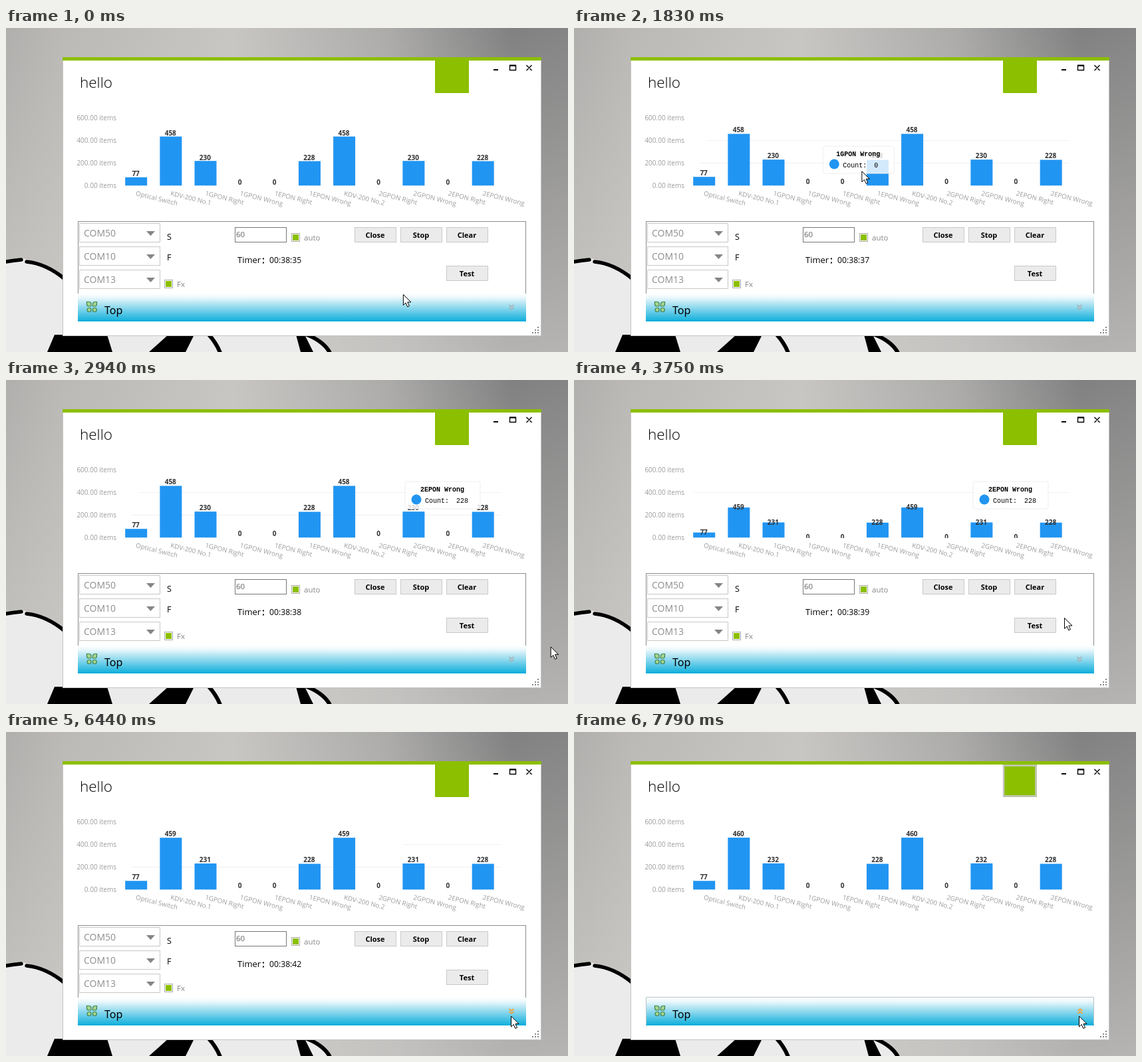
Write an HTML page that moves like this. It is 845 px wide and 488 px high and loops after 8 s.

```html
<!DOCTYPE html>
<html lang="en">
<head>
<meta charset="utf-8">
<title>Chart window</title>
<style>
html, body { margin: 0; width: 100%; height: 100%; overflow: hidden; background: #bbb; }
svg { display: block; width: 845px; height: 488px; font-family: "Open Sans", "Noto Sans", sans-serif; }
text { white-space: pre; }
.tip { font-family: "Liberation Mono", monospace; font-size: 10px; }
</style>
</head>
<body>
<svg id="stage" viewBox="0 0 845 488">
  <defs>
    <linearGradient id="wall">
      <stop offset="0" stop-color="#b0afad"/><stop offset=".1" stop-color="#bbb9b6"/>
      <stop offset=".4" stop-color="#c8c6c3"/><stop offset=".68" stop-color="#acabaa"/>
      <stop offset=".9" stop-color="#818181"/><stop offset="1" stop-color="#858585"/>
    </linearGradient>
    <linearGradient id="glow" x1="0" y1="0" x2="0" y2="1">
      <stop offset="0" stop-color="#d6d4d1" stop-opacity="0"/>
      <stop offset="1" stop-color="#d6d4d1" stop-opacity=".6"/>
    </linearGradient>
    <linearGradient id="sea" x1="0" y1="0" x2="0" y2="1">
      <stop offset="0" stop-color="#fff"/><stop offset=".15" stop-color="#eaf7fb"/>
      <stop offset="1" stop-color="#0caedb"/>
    </linearGradient>
    <clipPath id="plot"><rect x="108" y="100" width="690" height="138"/></clipPath>
  </defs>

  <rect width="845" height="488" fill="url(#wall)"/>
  <rect width="845" height="488" fill="url(#glow)"/>
  <path d="M0 351L25 347Q60 354 86 379V463H446Q474 470 488 488H0Z" fill="#ebebeb"/>
  <path d="M0 352Q12 350 23 349M31 352Q60 355 87 377" fill="none" stroke="#000" stroke-width="5.5" stroke-linecap="round"/>
  <path d="M73 462L62 488H160L152 462ZM244 462L215 488H270L283 462ZM436 462L443 488H462L449 462Z"/>
  <path d="M305 462Q316 474 322 489M450 461Q477 471 487 489" fill="none" stroke="#000" stroke-width="6"/>

  <rect x="85.500" y="44.500" width="719" height="419" fill="#fff" stroke="#c4c4c4"/>
  <rect x="85" y="44" width="720" height="5" fill="#8cbf00"/>
  <text x="111" y="90" font-size="22.500" font-weight="300">hello</text>
  <rect x="645" y="49" width="51" height="49" fill="#8cbf00"/>
  <rect id="ring" x="646" y="50.500" width="48.500" height="46" fill="none" stroke="#c6c6c6" stroke-width="2.500"/>
  <path d="M733 63H740M757 56.500H767" stroke="#000" stroke-width="2"/>
  <path d="M757.500 56.500H766.500V63.500H757.500ZM782.500 56L790.500 64M790.500 56L782.500 64" fill="none" stroke="#000" stroke-width="1.400"/>
  <path d="M799 451h2m-2 4h2m-2 4h2m-6-4h2m-2 4h2m-6 0h2" stroke="#888" stroke-width="2"/>

  <g id="axis" font-size="10" fill="#9b9b9b"></g>
  <path id="low" d="M188 203.500H744" stroke="#f0f0f0"/>
  <path id="high" stroke="#f0f0f0"/>
  <g id="bars" clip-path="url(#plot)"></g>

  <g id="panel">
    <rect x="108.500" y="291.500" width="673" height="109" fill="#fff" stroke="#8c8c8c"/>
    <g id="controls"></g>
    <text x="242" y="319" font-size="12.500">S</text>
    <text x="242" y="350" font-size="12.500">F</text>
    <rect x="344.500" y="300.500" width="77" height="22" fill="#fff" stroke="#777"/>
    <text x="346" y="315" font-size="11.500" fill="#666">60</text>
    <text x="348" y="354" font-size="13">Timer</text>
    <path d="M386 347.500h2m-2 6h2" stroke="#000" stroke-width="2"/>
    <text id="clock" x="396" y="354" font-size="12.200"></text>
  </g>

  <rect x="108" y="400" width="674" height="42" fill="url(#sea)"/>
  <path id="edge" d="M108.500 441V399.500H781.500V441" fill="none" stroke="#b5c4c8"/>
  <g fill="#a5d68c" stroke="#3e8355" stroke-width="1.200">
    <path d="M121.500 412.500h3.500a3 3 0 0 1 3 3v3.500h-3.500a3 3 0 0 1-3-3z"/>
    <path d="M136.500 412.500h-3a3 3 0 0 0-3 3v3.500h3a3 3 0 0 0 3-3z"/>
    <circle cx="125" cy="424.500" r="3"/><circle cx="133.300" cy="424.500" r="3"/>
  </g>
  <text x="148" y="431" font-size="16" font-family="Noto Sans, sans-serif">Top</text>
  <path id="chevron" d="M756.500 417l3.500 3 3.500-3m-7 4l3.500 3 3.500-3" fill="none" stroke-width="1.700"/>

  <g id="tip" class="tip">
    <rect id="tipBox" height="41" rx="3" fill="#fff" fill-opacity=".8" stroke="#eee"/>
    <circle cx="17" cy="27" r="7.500" fill="#2195f2"/>
    <text id="tipName" y="15" text-anchor="middle" font-weight="700"></text>
    <text x="30" y="32">Count:</text>
    <text id="tipValue" x="77" y="32"></text>
  </g>
  <path id="cursor" d="M0 0V16L3.700 12.500 6.300 18.500 9 17.300 6.400 11.500H11.500Z" fill="#fff" stroke="#000"/>
</svg>
<script>
const LOOP = 8000, GROW = 950, BASE = 237, UNIT = 0.17;
const names = ["Optical Switch", "KDV-200 No.1", "1GPON Right", "1GPON Wrong", "1EPON Right", "1EPON Wrong",
  "KDV-200 No.2", "2GPON Right", "2GPON Wrong", "2EPON Right", "2EPON Wrong"];
const updates = [-900, 3200, 6780];

// time, x, y
const pointer = [[0, 597.5, 401.5], [200, 570, 385], [700, 310, 250], [1000, 215.5, 217.5], [1230, 215.5, 217.5],
  [2130, 541, 215], [2300, 795.5, 251.5], [2450, 795.5, 251.5], [3000, 822, 420], [3250, 825, 450], [3700, 737.5, 358.5],
  [3850, 737.5, 358.5], [4450, 734, 461], [5000, 730.5, 454.5], [5350, 730.5, 454.5], [5900, 754, 432],
  [6100, 759.5, 428], [8000, 759.5, 428]];
// time, x, y, bar index
const tips = [[900, 203, 178, 0], [1250, 203, 178, 0], [1400, 240, 166, 1], [1550, 285, 170, 2], [1700, 335, 178, 3],
  [1850, 380, 178, 4], [2000, 420, 168, 5], [2130, 440, 158, 6], [2270, 460, 156, 8], [2450, 460, 156, 8],
  [2600, 600, 153, 10], [4200, 600, 153, 10]];

const $ = id => document.getElementById(id);
const show = (id, on) => $(id).setAttribute("visibility", on ? "visible" : "hidden");

function add(parent, tag, attrs, text) {
  const el = document.createElementNS("http://www.w3.org/2000/svg", tag);
  for (const k in attrs) el.setAttribute(k, attrs[k]);
  if (text !== undefined) el.textContent = text;
  return parent.appendChild(el);
}

function along(keys, t) {
  let i = 0;
  while (i < keys.length - 2 && t >= keys[i + 1][0]) i++;
  const [a, b] = [keys[i], keys[i + 1]];
  const k = Math.min(1, Math.max(0, (t - a[0]) / (b[0] - a[0])));
  return { x: a[1] + (b[1] - a[1]) * k, y: a[2] + (b[2] - a[2]) * k, item: k < 1 ? a[3] : b[3] };
}

const place = (id, p) => $(id).setAttribute("transform", `translate(${p.x} ${p.y})`);

for (let i = 0; i < 4; i++)
  add($("axis"), "text", { x: 166, y: 241 - 34 * i, "text-anchor": "end" }, (200 * i).toFixed(2) + " items");

const bars = names.map((name, i) => {
  const mid = 195.6 + 52.15 * i;
  add($("axis"), "text", { transform: `translate(${mid - 1} 252) rotate(14)`, "font-size": 9.8 }, name);
  return {
    box: add($("bars"), "rect", { x: mid - 16.4, width: 33, fill: "#2195f2" }),
    label: add($("bars"), "text", { x: mid - 0.5, "text-anchor": "middle", "font-size": 10, "font-weight": 700, fill: "#303030" })
  };
});

["COM50", "COM10", "COM13"].forEach((name, i) => {
  const y = 294.5 + 35 * i, g = $("controls");
  add(g, "rect", { x: 110.5, y, width: 121, height: 28, fill: "#fff", stroke: "#c8c8c8" });
  add(g, "text", { x: 117, y: y + 19.5, "font-size": 14, fill: "#8e8e8e" }, name);
  add(g, "path", { d: `M211 ${y + 11.5}h13l-6.500 7z`, fill: "#858585" });
});
[["auto", 429.5, 309.5], ["Fx", 238.5, 379.5]].forEach(([name, x, y]) => {
  add($("controls"), "rect", { x, y, width: 12, height: 12, fill: "#fff", stroke: "#aaa" });
  add($("controls"), "rect", { x: x + 1.5, y: y + 1.5, width: 9, height: 9, fill: "#8cbf00" });
  add($("controls"), "text", { x: x + 18.5, y: y + 10.5, "font-size": 11.5, fill: "#858585" }, name);
});
[["Close", 524, 300], ["Stop", 593, 300], ["Clear", 662, 300], ["Test", 662, 358]].forEach(([name, x, y]) => {
  add($("controls"), "rect", { x: x + 0.5, y: y + 0.5, width: 62, height: 22, fill: "#ebebeb", stroke: "#c9c9c9" });
  add($("controls"), "text", { x: x + 31, y: y + 16, "text-anchor": "middle", "font-size": 11, "font-weight": 700 }, name);
});

function draw(t) {
  const round = t < updates[1] ? 0 : t < updates[2] ? 1 : 2;
  const grown = Math.min(1, (t - updates[round]) / GROW);
  const big = 458 + round, half = 230 + round;
  const values = [77, big, half, 0, 0, 228, big, 0, half, 0, 228];
  bars.forEach(({ box, label }, i) => {
    const h = values[i] * UNIT * grown;
    box.setAttribute("y", BASE + 0.3 - h);
    box.setAttribute("height", h);
    label.setAttribute("y", 248 - (13 + values[i] * UNIT) * grown);
    label.textContent = values[i];
  });

  const late = t >= 4200;
  show("low", (t >= 150 && round === 0) || (late && round === 1));
  show("high", t >= 150 && round < 2);
  $("high").setAttribute("d", `M${late ? 598 : round ? 179 : 200} 169.500H744`);

  const tipOn = t >= tips[0][0] && t < 4200;
  show("tip", tipOn);
  if (tipOn) {
    const p = along(tips, t), value = String(values[p.item]), extra = value.length > 2 ? 6 : 0;
    place("tip", p);
    $("tipBox").setAttribute("width", 107 + extra);
    $("tipName").setAttribute("x", 53 + extra / 2);
    $("tipName").textContent = names[p.item];
    $("tipValue").textContent = value;
  }

  const closed = t >= 7520;
  show("panel", !closed);
  show("edge", closed);
  show("ring", t >= 6800);
  $("clock").textContent = "00:38:" + (35 + Math.floor((t + 580) / 1000));
  $("chevron").setAttribute("stroke", t >= 5900 ? "#f5a032" : "#a9b3b8");
  $("chevron").setAttribute("transform", closed ? "translate(1 841) scale(1 -1)" : "");
  place("cursor", along(pointer, t));
}

const start = performance.now();
function tick() {
  draw((performance.now() - start) % LOOP);
  requestAnimationFrame(tick);
}
tick();
</script>
</body>
</html>
```
